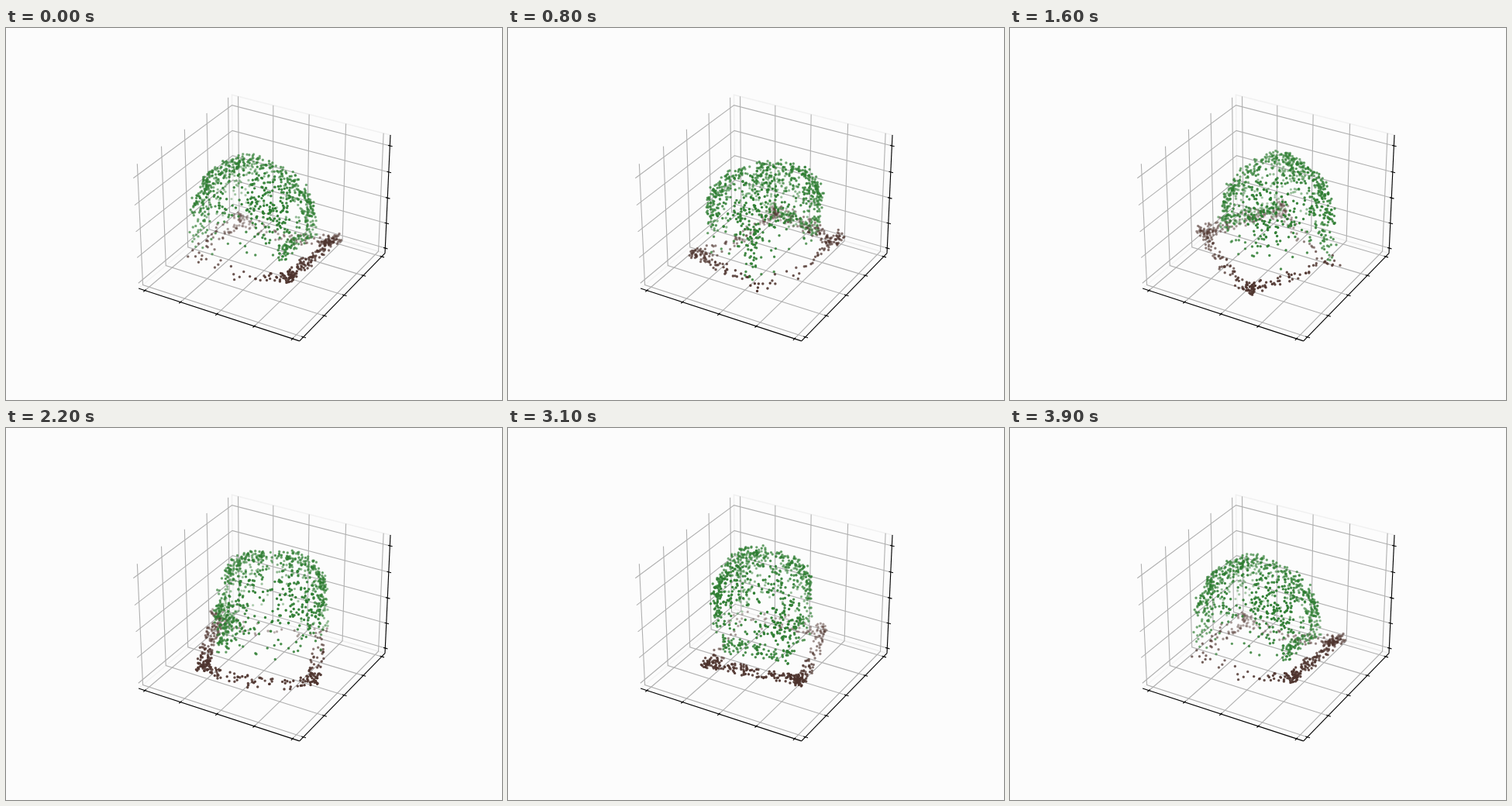
An HTML page with a canvas for the animation above (4000 ms loop, 640 px wide and 480 px high).

```html
<!DOCTYPE html>
<html lang="en">
<head>
<meta charset="utf-8">
<title>Rotating point cloud</title>
<style>
  html, body { margin: 0; width: 100%; height: 100%; overflow: hidden; background: #fcfcfc; }
  canvas { display: block; width: 640px; height: 480px; }
</style>
</head>
<body>
<canvas id="stage" width="640" height="480"></canvas>
<script>
const ctx = document.getElementById('stage').getContext('2d');
const STEP = 100, STEPS = 40;
const XY = 0.5952, Z = 0.4464;          // half sizes of the axes box
const BROWN = '#4e342e', GREEN = '#2e7d32';

// Camera at azimuth -60, elevation 30, distance 10
const C = Math.cos(Math.PI / 6);
function project([x, y, z]) {
  const right = C * x + 0.5 * y;
  const toward = 0.5 * x - C * y;
  const near = C * toward + 0.5 * z;
  const scale = 1997.8 / (10 - near);
  return [333 + scale * right, 237.4 - scale * (C * z - 0.5 * toward), near];
}

function line(color, width, ...points) {
  ctx.beginPath();
  for (const p of points) {
    const [x, y] = project(p);
    ctx.lineTo(x, y);
  }
  ctx.strokeStyle = color;
  ctx.lineWidth = width;
  ctx.stroke();
}
const grid = (...points) => line('#b0b0b0', 1.11, ...points);
const ink = (...points) => line('#000', 1.11, ...points);

function drawAxes() {
  const a = XY, h = Z, out = a + 0.018, inn = a - 0.013;
  line('rgba(230,230,230,.5)', 1.39, [-a, a, -h], [a, a, -h], [a, a, h], [-a, a, h], [-a, a, -h]);
  line('rgba(236,236,236,.5)', 1.39, [-a, -a, -h], [a, -a, -h], [a, a, -h], [-a, a, -h], [-a, -a, -h]);

  const flat = [], tall = [];
  for (let i = -2; i <= 2; i++) {
    flat.push(i * 0.273);
    tall.push(i * 0.1935 - 0.0187);
  }
  for (const t of flat) {
    grid([t, -a, -h], [t, a, -h], [t, a, h]);
    grid([a, t, -h], [-a, t, -h], [-a, t, h]);
  }
  for (const t of tall) grid([-a, -a, t], [-a, a, t], [a, a, t]);

  ink([-a, -a, -h], [a, -a, -h]);
  ink([a, -a, -h], [a, a, -h]);
  ink([a, a, -h], [a, a, h]);
  for (const t of flat) {
    ink([t, -out, -h], [t, -inn, -h]);
    ink([out, t, -h], [inn, t, -h]);
  }
  for (const t of tall) ink([out, a, t], [inn, a, t]);
}

let seed = 20;
function rand() {
  seed = (seed + 0x6d2b79f5) | 0;
  let t = Math.imul(seed ^ (seed >>> 15), 1 | seed);
  t = (t + Math.imul(t ^ (t >>> 7), 61 | t)) ^ t;
  return ((t ^ (t >>> 14)) >>> 0) / 4294967296;
}
const between = (lo, hi) => lo + (hi - lo) * rand();
const jitter = r => between(-r, r);
const scatter = (n, make) => Array.from({ length: n }, make);
const bend = (v, p) => Math.sign(v) * Math.abs(v) ** p;

// Rounded rectangle seen from above
function ring(size) {
  const angle = between(0, 2 * Math.PI);
  return [-0.04 + 0.34 * size * bend(Math.cos(angle), 0.65), -0.03 + 0.29 * size * bend(Math.sin(angle), 0.65)];
}

// Band around a rectangle: crowded corners, thin towards -x -y
function rimPoint() {
  const along = Math.sin(jitter(Math.PI / 2)), side = rand() < 0.5 ? -1 : 1;
  const [u, v] = rand() < 0.45 ? [along, side] : [side, along];
  const size = between(0.78, 1);
  const x = 0.4 * u * size, y = 0.33 * v * size;
  if (rand() > Math.max(0.1, 0.6 + 0.9 * (x + y))) return rimPoint();
  return [x, y, -0.33 + 0.55 * x * x + 0.06 * x - 0.06 * y + jitter(0.035)];
}

// Dome that drops towards +x +y
function crownPoint() {
  const tilt = Math.PI / 2 * rand() ** 0.55;
  const [x, y] = ring(Math.sin(tilt) ** 0.8);
  const z = 0.05 + 0.29 * Math.cos(tilt) ** 0.8 - 0.12 * y - 0.25 * Math.max(0, x + y - 0.05);
  return [x + jitter(0.025), y + jitter(0.025), z + jitter(0.03)];
}

const wallPoint = () => [...ring(between(0.92, 1.04)), -0.24 + 0.31 * Math.sqrt(rand())];
const skirtPoint = () => [between(0.2, 0.28), jitter(0.24), between(-0.2, -0.1)];
const postPoint = () => [between(-0.4, -0.33), between(-0.3, -0.2), between(-0.24, 0.15)];

const rim = scatter(340, rimPoint);
const leaves = [
  ...scatter(590, crownPoint), ...scatter(140, wallPoint),
  ...scatter(80, skirtPoint), ...scatter(35, postPoint)
];

function drawCloud(cloud, color, angle) {
  const c = Math.cos(angle), s = Math.sin(angle);
  const dots = cloud.map(([x, y, z]) => project([c * x - s * y, s * x + c * y, z]));
  dots.sort((p, q) => p[2] - q[2]);
  const far = dots[0][2], depth = dots[dots.length - 1][2] - far;
  ctx.fillStyle = ctx.strokeStyle = color;
  ctx.lineWidth = 2.08;
  for (const [x, y, near] of dots) {
    ctx.globalAlpha = 0.3 + 0.7 * (near - far) / depth;
    ctx.beginPath();
    ctx.arc(x, y, 0.69, 0, 2 * Math.PI);
    ctx.fill();
    ctx.stroke();
  }
  ctx.globalAlpha = 1;
}

const start = performance.now();
let shown = -1;
function tick() {
  const step = Math.floor((performance.now() - start) / STEP) % STEPS;
  if (step !== shown) {
    shown = step;
    const angle = 2 * Math.PI * step / (STEPS - 1);
    ctx.fillStyle = '#fcfcfc';
    ctx.fillRect(0, 0, 640, 480);
    drawAxes();
    drawCloud(rim, BROWN, angle);
    drawCloud(leaves, GREEN, angle);
  }
  requestAnimationFrame(tick);
}
tick();
</script>
</body>
</html>
```
